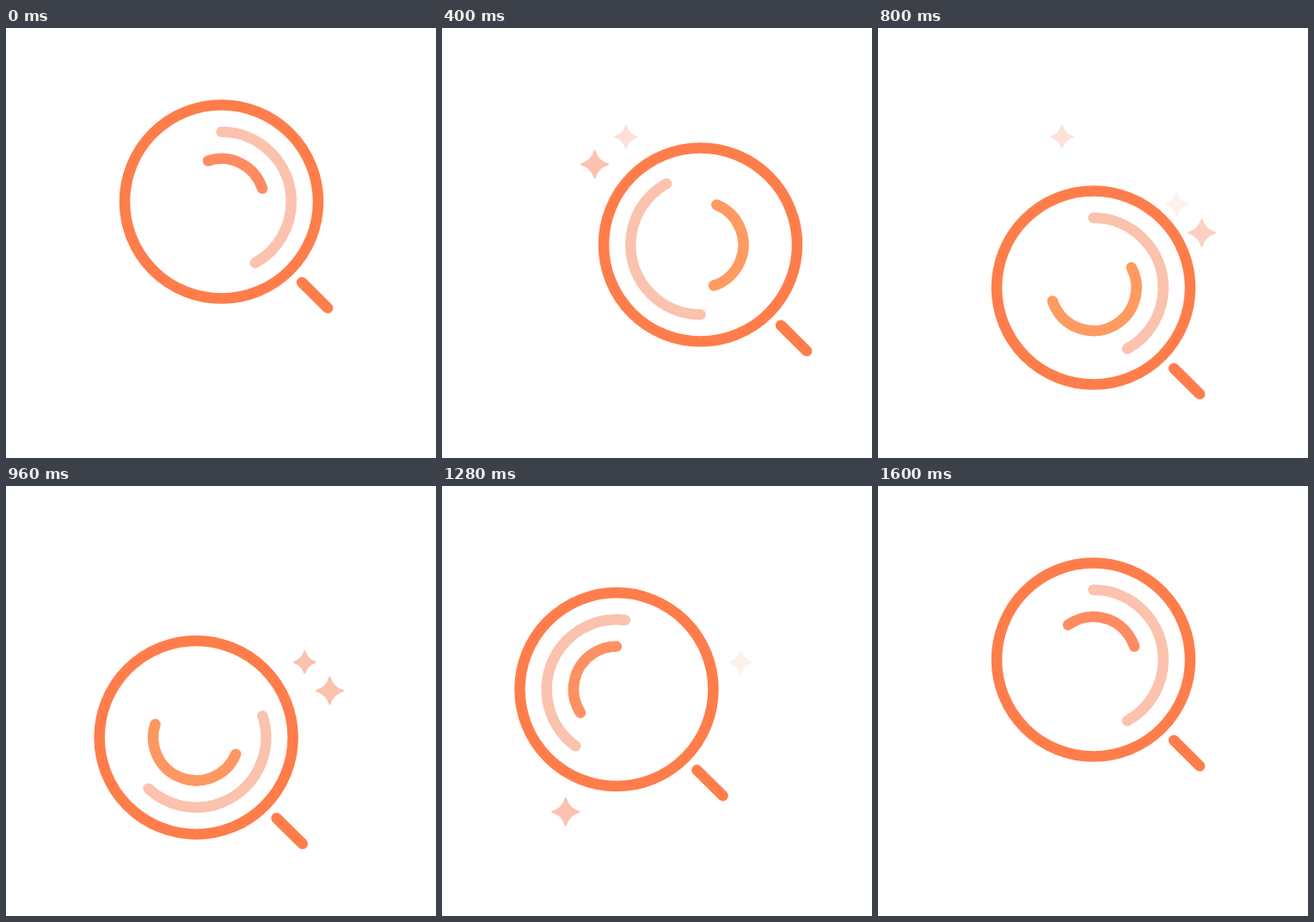
These frames come from a looping animation (500x500 px, 1.64 s). An HTML page with a canvas:

```html
<!DOCTYPE html>
<html lang="en">
<head>
<meta charset="utf-8">
<title>Searching</title>
<style>
  html, body { margin: 0; width: 100%; height: 100%; overflow: hidden; background: #fff; }
  canvas { display: block; width: 500px; height: 500px; }
</style>
</head>
<body>
<canvas id="stage" width="500" height="500"></canvas>
<script>
const ctx = document.getElementById('stage').getContext('2d');
const LOOP = 1640, STEP = 40, TURN = 1600;
const MAIN = '#ff7d4a', PALE = '#fbc2ae';
const STROKE = 12.5;

// Piecewise linear interpolation over [time, value] pairs
function track(keys, t) {
  for (let i = 1; i < keys.length; i++) {
    const [t0, v0] = keys[i - 1], [t1, v1] = keys[i];
    if (t <= t1) return v0 + (v1 - v0) * Math.max(0, (t - t0) / (t1 - t0));
  }
  return keys[keys.length - 1][1];
}

const sweepKeys = [[0, 90], [840, 195], [1480, 90], [1600, 108]];
const greenKeys = [[0, 139], [240, 154], [800, 154], [1160, 148], [1440, 139]];

const FADE = 160;
const sparkles = [
  { x: 177.5, y: 158.5, r: 16.5, from: 240, to: 800 },
  { x: 213.8, y: 126.7, r: 13.5, from: 320, to: 880 },
  { x: 376.5, y: 238.2, r: 16.5, from: 680, to: 1240 },
  { x: 347.3, y: 204.8, r: 13.5, from: 760, to: 1320 },
  { x: 143.8, y: 378.8, r: 16.5, from: 1040, to: 1520 }
];

// Angles in degrees, clockwise from the top
function arc(radius, start, sweep, color) {
  const a = (start - 90) * Math.PI / 180;
  ctx.beginPath();
  ctx.arc(0, 0, radius, a, a + sweep * Math.PI / 180);
  ctx.strokeStyle = color;
  ctx.stroke();
}

function sparkle({ x, y, r, from, to }, t) {
  const alpha = Math.min(1, (t - from) / FADE, (to - t) / FADE);
  if (alpha <= 0) return;
  const mix = c => Math.round(255 + (c - 255) * alpha);
  const color = `rgb(${mix(251)},${mix(194)},${mix(174)})`;
  const tip = r - 1.2, waist = r * 0.2;
  ctx.save();
  ctx.translate(x, y);
  ctx.beginPath();
  ctx.moveTo(0, -tip);
  for (let i = 0; i < 4; i++) {
    ctx.quadraticCurveTo(waist, -waist, tip, 0);
    ctx.rotate(Math.PI / 2);
  }
  ctx.closePath();
  ctx.fillStyle = ctx.strokeStyle = color;
  ctx.lineWidth = 2.4;
  ctx.lineJoin = 'round';
  ctx.fill();
  ctx.stroke();
  ctx.restore();
}

function draw(t) {
  const turn = t / TURN * 360;
  const a = turn * Math.PI / 180;
  ctx.fillStyle = '#fff';
  ctx.fillRect(0, 0, 500, 500);
  sparkles.forEach(s => sparkle(s, t));

  ctx.save();
  ctx.translate(250.5 + 50 * Math.sin(a), 252 - 50 * Math.cos(a));
  ctx.lineWidth = STROKE;
  ctx.lineCap = 'round';
  arc(112.5, 0, 360, MAIN);
  arc(81.25, turn * 2, 151, PALE);
  const sweep = track(sweepKeys, t);
  arc(50, 72 + turn - sweep, sweep, `rgb(255,${Math.round(track(greenKeys, t))},97)`);
  ctx.beginPath();
  ctx.moveTo(93.5, 93.8);
  ctx.lineTo(123.6, 123.6);
  ctx.strokeStyle = MAIN;
  ctx.stroke();
  ctx.restore();
}

function tick() {
  const t = (performance.now() + 0.5) % LOOP;
  draw(Math.floor(t / STEP) * STEP);
  requestAnimationFrame(tick);
}
tick();
</script>
</body>
</html>
```
